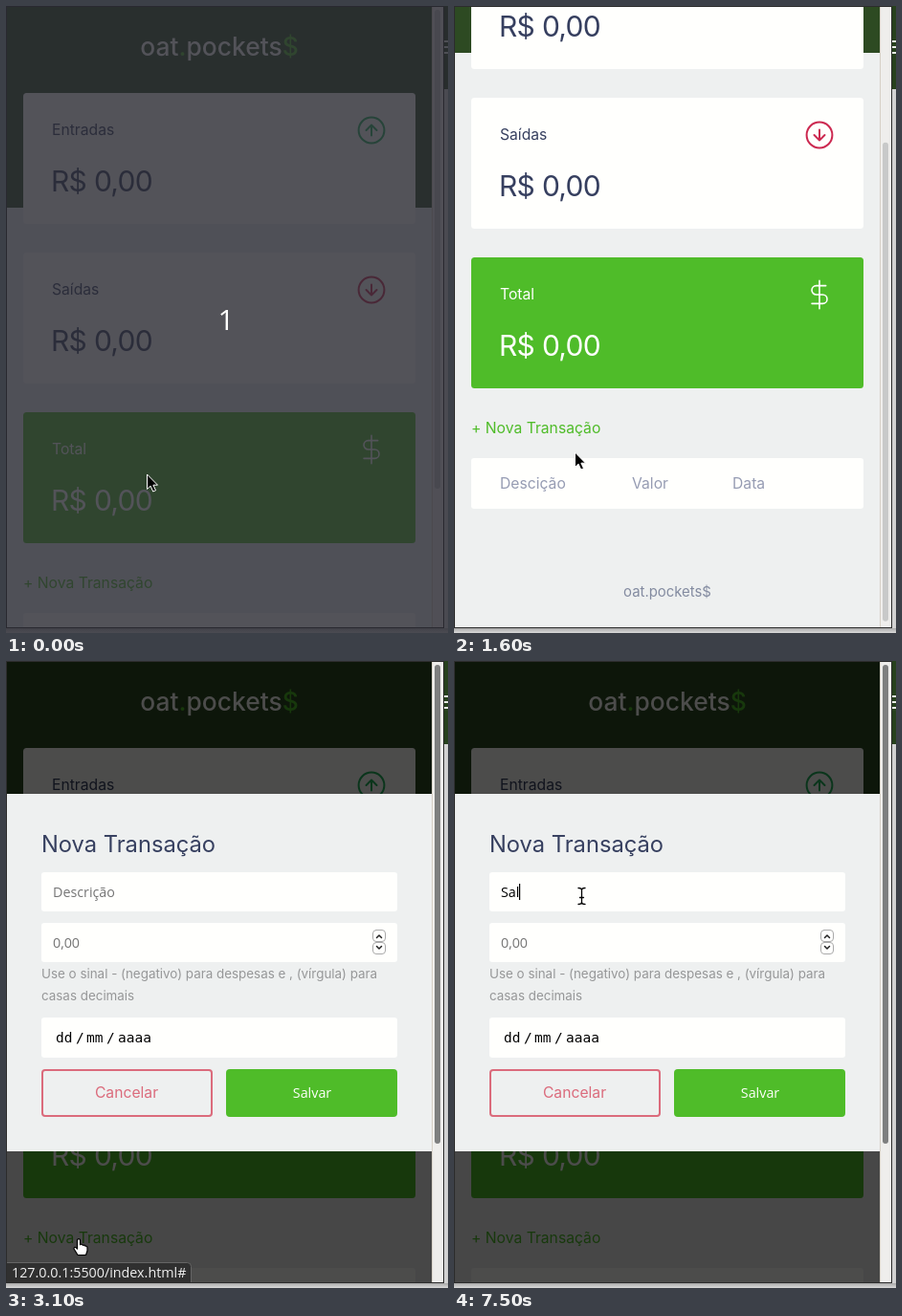
Write an HTML page that moves like this. It is 462 px wide and 656 px high and loops after 8000 ms.

```html
<!DOCTYPE html>
<html lang="pt">
<head>
<meta charset="utf-8">
<title>Nova Transação</title>
<style>
html, body { margin: 0; width: 100%; height: 100%; overflow: hidden; background: #d2d2d2; }
svg { display: block; width: 462px; height: 656px; }
text { font-family: Inter, Lato, sans-serif; font-size: 15.7px; white-space: pre; }
.value { font-size: 30px; letter-spacing: -.7px; }
.logo { font-size: 26.4px; font-weight: 500; }
.title { font-size: 23.7px; }
.help { font-size: 13.4px; fill: #969798; }
.field { font-family: "Open Sans", "Noto Sans", sans-serif; font-size: 14.3px; }
.date { font-family: "DejaVu Sans Mono", monospace; font-size: 14.5px; }
.navy { fill: #363f5f; }
.line { fill: none; stroke-linecap: round; stroke-linejoin: round; }
</style>
</head>
<body>
<svg viewBox="0 0 462 656">
  <defs>
    <clipPath id="view"><rect x="1" y="1" width="444" height="649"/></clipPath>
    <linearGradient id="shade" x2="0" y2="1">
      <stop stop-color="#a9a9a9"/><stop offset="1" stop-color="#dadada"/>
    </linearGradient>
    <g id="ring" class="line" stroke-width="2">
      <circle r="13.4"/>
      <path d="M0 5.5V-5.5M-5.5 0L0 -5.5L5.5 0"/>
    </g>
  </defs>

  <rect width="462" height="656" fill="#d2d2d2"/>
  <rect x="458" width="4" height="87" fill="#27411d"/>
  <path d="M458 37h4M458 43h4M458 49h4" stroke="#e8ebe6" stroke-width="2"/>
  <rect y="651" width="462" height="5" fill="url(#shade)"/>

  <g clip-path="url(#view)">
    <rect width="446" height="651" fill="#eef0f0"/>
    <g id="page">
      <rect width="446" height="211" fill="#2d4a22"/>
      <text class="logo" x="223" y="52" text-anchor="middle" fill="#fffffd">oat<tspan fill="#4fbc29">.</tspan>pockets<tspan fill="#4fbc29">$</tspan></text>
      <g id="cards"></g>
      <use href="#ring" x="382" y="130" stroke="#22b25c"/>
      <use href="#ring" transform="translate(382 297) rotate(180)" stroke="#cc2950"/>
      <path class="line" transform="translate(366 448) scale(1.333)" stroke="#fffffd" stroke-width="1.2"
        d="M12 1V23M17 5H9.5a3.5 3.5 0 0 0 0 7h5a3.5 3.5 0 0 1 0 7H6"/>
      <text x="18" y="609" fill="#4fbc29">+ Nova Transação</text>
      <rect x="18" y="635" width="410" height="53" rx="3" fill="#fffffd"/>
      <g fill="#969cb3">
        <text x="48" y="667">Descição</text>
        <text x="186" y="667">Valor</text>
        <text x="291" y="667">Data</text>
      </g>
      <text x="223" y="780" text-anchor="middle" style="font-size:14.9px" fill="#838ba0">oat.pockets$</text>
    </g>

    <g id="modal">
      <rect width="446" height="651" fill="#000" opacity=".7"/>
      <rect y="139" width="446" height="374" fill="#eef0f0"/>
      <text class="title navy" x="37" y="200">Nova Transação</text>
      <g fill="#fffffd">
        <rect x="37" y="221" width="372" height="41" rx="3"/>
        <rect x="37" y="274" width="372" height="41" rx="3"/>
        <rect x="37" y="373" width="372" height="42" rx="3"/>
      </g>
      <text id="typed" class="field" x="49" y="247"></text>
      <rect id="caret" y="233" width="1.2" height="17"/>
      <text class="field" x="49" y="300" fill="#757575">0,00</text>
      <g class="line" stroke="#aaa">
        <rect x="383.5" y="281.5" width="13" height="12" rx="3.5"/>
        <rect x="383.5" y="294.5" width="13" height="12" rx="3.5"/>
        <path d="M387.5 289.5l2.5 -2.5l2.5 2.5M387.5 298.5l2.5 2.5l2.5 -2.5" stroke="#222" stroke-width="1.5"/>
      </g>
      <text class="help" x="37" y="332">Use o sinal - (negativo) para despesas e , (vírgula) para</text>
      <text class="help" x="37" y="355">casas decimais</text>
      <text class="date" x="52" y="399">dd</text>
      <text class="date" x="73" y="399">/</text>
      <text class="date" x="84" y="399">mm</text>
      <text class="date" x="105" y="399">/</text>
      <text class="date" x="117" y="399">aaaa</text>
      <rect x="38" y="428" width="177" height="48" rx="3" fill="none" stroke="#db6b7c" stroke-width="2"/>
      <text x="126" y="457" text-anchor="middle" fill="#db6b7c">Cancelar</text>
      <rect x="230" y="427" width="179" height="50" rx="4" fill="#4fbc29"/>
      <text class="field" x="320" y="457" text-anchor="middle" fill="#fffffd">Salvar</text>
    </g>

    <g id="status">
      <path d="M0 629.5H189.5a4 4 0 0 1 4 4V651H0Z" fill="#303030" stroke="#656565"/>
      <text class="field" x="6" y="645" fill="#f0f0f0">127.0.0.1:5500/index.html#</text>
    </g>
  </g>

  <rect x="445" y="1" width="12" height="649" fill="#efeeec"/>
  <rect x="445" y="1" width="1" height="649" fill="#d6d0c6"/>
  <rect id="thumb" x="448" width="6" height="501" rx="3"/>
  <rect x=".5" y=".5" width="457" height="650" fill="none" stroke="#2c2c2c"/>

  <g id="countdown">
    <rect width="462" height="656" fill="#292931" opacity=".8"/>
    <text x="230" y="339" text-anchor="middle" fill="#fff" style="font:30px 'Open Sans','Noto Sans',sans-serif">1</text>
  </g>

  <path id="arrow" d="M0 0V15.5L3.6 12.2L6.2 18L9 16.8L6.4 11.2H11Z" fill="#000" stroke="#fff" stroke-linejoin="round"/>
  <g id="beam" class="line">
    <path d="M-3.5 -8.5Q0 -8.5 0 -6.5Q0 -8.5 3.5 -8.5M0 -6.5V6.5M-3.5 8.5Q0 8.5 0 6.5Q0 8.5 3.5 8.5M-2 1.5H2" stroke="#fff" stroke-width="2.4" opacity=".55"/>
    <path d="M-3.5 -8.5Q0 -8.5 0 -6.5Q0 -8.5 3.5 -8.5M0 -6.5V6.5M-3.5 8.5Q0 8.5 0 6.5Q0 8.5 3.5 8.5M-2 1.5H2" stroke="#000" stroke-width="1.3"/>
  </g>
  <path id="hand" d="M-1.5 1.2Q0 -1 1.5 1.2V6.2Q3.2 5 4.2 6.8Q6 6 6.8 7.6Q9 7.2 9 9.5V12.5L7.5 17H-1L-5 10.5Q-5 8 -2.8 9.2L-1.5 10.6Z"
    fill="#fff" stroke="#000" stroke-width="1.2" stroke-linejoin="round"/>
</svg>
<script>
const LOOP = 8000, STEP = 100;
const $ = id => document.getElementById(id);
const show = (id, on) => $(id).setAttribute('display', on ? 'inline' : 'none');
const move = (id, x, y) => $(id).setAttribute('transform', `translate(${x} ${y})`);

// Last entry whose time has been reached
const at = (keys, t) => keys.filter(k => k[0] <= t).pop();

const scrolls = [[0, 0], [500, 11], [600, 148], [800, 155], [900, 162], [1700, 148], [2000, 0]];
const statusAlpha = [[0, 0], [2700, .4], [2800, .8], [2900, 1], [3200, .6], [3300, .3], [3400, 0]];
const entries = [[0, ''], [6600, 'S'], [6900, 'Sa'], [7500, 'Sal']];
const carets = [[0, 0], [5000, 49], [5700, 0], [6600, 57], [6900, 0], [7000, 65], [7500, 68]];
const pointers = [
  [0, 'arrow', 147.5, 490], [400, 'beam', 143, 498], [500, 'beam', 141.5, 499.5],
  [1200, 'arrow', 134, 506], [1300, 'arrow', 129, 509], [1400, 'arrow', 128, 490], [1600, 'arrow', 126.5, 467],
  [2100, 'arrow', 125, 488], [2200, 'arrow', 117, 538], [2300, 'arrow', 103, 588], [2400, 'arrow', 90, 612],
  [2600, 'hand', 86, 608], [2700, 'hand', 82, 606], [2800, 'hand', 79, 605], [2900, 'hand', 77, 604.5],
  [3000, 'hand', 76, 604.5], [3200, 'arrow', 76, 604]
];

function pointer(t) {
  if (t < 3500) return at(pointers, t).slice(1);
  if (t >= 4400) return ['beam', 133.5, 246];
  // Curved sweep from the link up to the first field
  const s = (t - 3400) / 900, u = s * s * (3 - 2 * s), v = 1 - u;
  const bend = (a, b, c) => a * v * v + 2 * b * u * v + c * u * u;
  const x = bend(76, 190, 134), y = bend(603, 440, 247);
  const overField = y < 262 || (y > 274 && y < 315);
  return [overField ? 'beam' : 'arrow', x, y];
}

$('cards').innerHTML = ['Entradas', 'Saídas', 'Total'].map((name, i) => {
  const y = 91 + 167 * i, total = i === 2, ink = total ? '#fffffd' : '#363f5f';
  return `<rect x="18" y="${y}" width="410" height="137" rx="3.5" fill="${total ? '#4fbc29' : '#fffffd'}"/>
    <text x="48" y="${y + 44}" fill="${ink}">${name}</text>
    <text class="value" x="47" y="${y + 103}" fill="${ink}">R$ 0,00</text>`;
}).join('');

function draw(time) {
  const t = Math.floor(time % LOOP / STEP) * STEP;
  const scroll = at(scrolls, t)[1], open = t >= 3100;
  move('page', 0, -scroll);
  $('thumb').setAttribute('y', 4 + scroll * .857);
  $('thumb').setAttribute('fill', open ? '#7e7f7f' : '#c8c9c9');
  show('countdown', t < 300);
  show('modal', open);
  $('status').setAttribute('opacity', at(statusAlpha, t)[1]);

  const typed = at(entries, t)[1], caret = at(carets, t)[1];
  $('typed').textContent = typed || 'Descrição';
  $('typed').setAttribute('fill', typed ? '#000' : '#757575');
  $('caret').setAttribute('x', caret);
  show('caret', caret > 0);

  const [kind, x, y] = pointer(t);
  for (const id of ['arrow', 'beam', 'hand']) show(id, id === kind);
  move(kind, x, y);
}

const start = performance.now();
function tick() {
  draw(performance.now() - start);
  requestAnimationFrame(tick);
}
tick();
</script>
</body>
</html>
```
